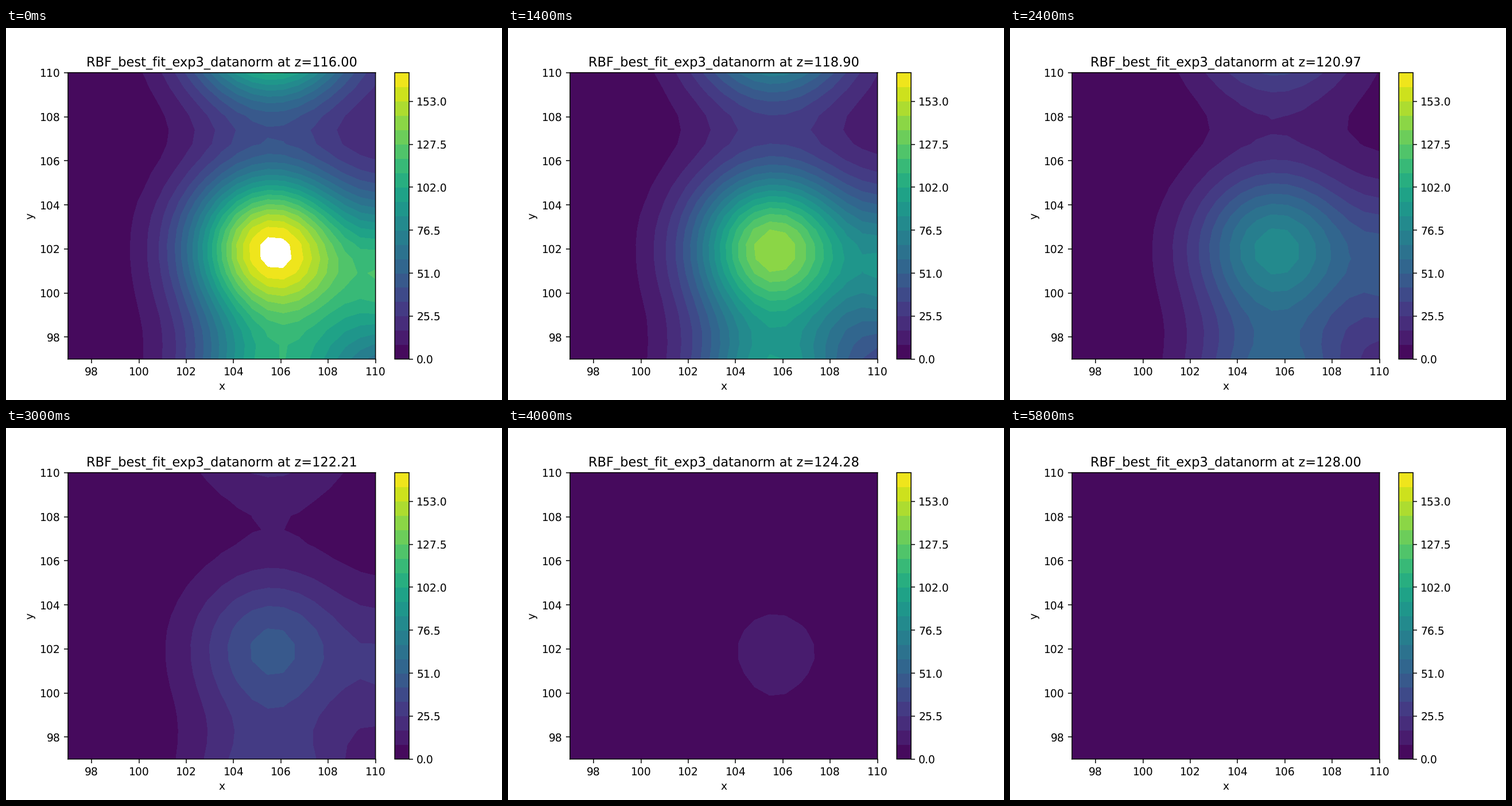
A matplotlib script that plays this animation: 864x648 px, repeating every 6 s.

```python
import numpy as np
import matplotlib.pyplot as plt
from matplotlib.animation import FuncAnimation

# Soft edges: no pixel snapping or glyph hinting
plt.rcParams.update({"path.snap": False, "text.hinting": "none"})

FRAMES = 30
Z0, Z1 = 116, 128
LOW, HIGH = 97, 110
LEVELS = np.linspace(0, 170, 21)
PEAK = 169
WIDTH_X, WIDTH_Y = 11.7, 12.6  # shared squared widths of the kernel

# x, y, relative height, growth rate with z
BUMPS = [
    (105.57, 102.08, 1.0, 0.0),
    (105.6, 112.35, 0.953, -0.068),
    (105.57, 95.2, 0.601, 0.048),
    (112.6, 101.1, 0.757, 0.0),
    (109.2, 98.4, 0.19, -0.65),
    (112.5, 109.0, 0.09, -0.25),
]

axis = np.linspace(LOW, HIGH, 21)
X, Y = np.meshgrid(axis, axis)


def field(z):
    rise = z - Z0
    total = sum(
        h * np.exp(k * rise - (X - cx) ** 2 / WIDTH_X - (Y - cy) ** 2 / WIDTH_Y)
        for cx, cy, h, k in BUMPS
    )
    return PEAK * np.exp(-(rise / 5.55) ** 2.6) * total


fig, ax = plt.subplots(figsize=(6.4, 4.8), dpi=135)


def draw(i):
    z = Z0 + (Z1 - Z0) * i / (FRAMES - 1)
    ax.clear()
    filled = ax.contourf(X, Y, field(z), levels=LEVELS, cmap="viridis")
    ax.set_xlabel("x")
    ax.set_ylabel("y")
    ax.set_title(f"RBF_best_fit_exp3_datanorm at z={z:.2f}")
    return filled


fig.colorbar(draw(0), ax=ax)
anim = FuncAnimation(fig, draw, frames=FRAMES, interval=200, repeat=True,
                     repeat_delay=0, blit=False)
plt.show()
```
